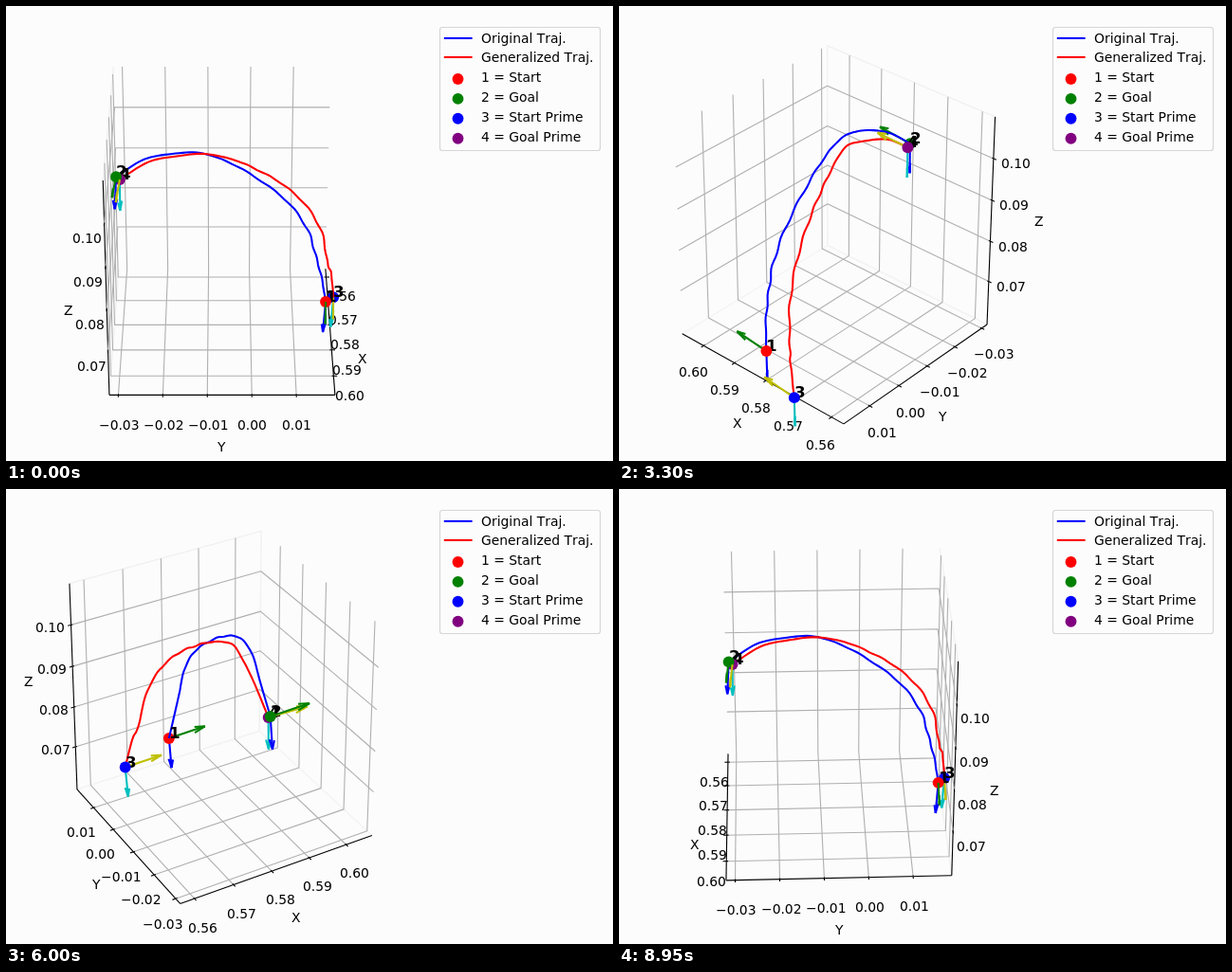
Write an HTML page with a canvas that moves like this. It is 640 px wide and 480 px high and loops after 9 s.

```html
<!DOCTYPE html>
<html lang="en">
<head>
<meta charset="utf-8">
<title>Rotating 3D trajectories</title>
<style>
  html, body { margin: 0; width: 100%; height: 100%; overflow: hidden; background: #fcfcfc; }
  canvas { display: block; }
</style>
</head>
<body>
<canvas id="stage" width="640" height="480"></canvas>
<script>
const ctx = document.getElementById('stage').getContext('2d');

// Plot area and camera
const AREA = { left: 15, bottom: 465, width: 414.6, height: 450 };
const ELEV = Math.PI / 6, DIST = 10;
const STEP_MS = 50, STEPS = 180;

// Data space is a unit cube centred on zero
const CENTER = [0.58173, -0.00667, 0.08442], RANGE = 0.0487;
const DELTA = 1 / 12, EDGE = 0.5 + DELTA / 4;
const PER_POINT = 48 / (0.72 * (AREA.width + AREA.height));
const TICK_PAD = 11.5 * PER_POINT * DELTA, NAME_PAD = 25 * PER_POINT * DELTA;
const THIN = 1.11, THICK = 2.08;

const BLUE = '#0000ff', RED = '#ff0000', GREEN = '#008000', PURPLE = '#800080';
const YELLOW = '#bfbf00', CYAN = '#00bfbf';
const FONT = '13.89px "DejaVu Sans", sans-serif';
const BOLD = 'bold 16.67px "DejaVu Sans", sans-serif';

const AXES = [
  { name: 'X', first: 0.56, count: 5, tickDir: 1, flip: 1 },
  { name: 'Y', first: -0.03, count: 5, tickDir: 0, flip: 0 },
  { name: 'Z', first: 0.07, count: 4, tickDir: 0, flip: 0 },
];

const ALONG = [0.2, -0.01, 0.01], DOWN = [0.007, -0.01, -0.155];
const START = { label: '1', name: 'Start', color: RED, at: [-0.018, 0.497, -0.389],
  arrows: [[GREEN, ALONG], [BLUE, DOWN]] };
const GOAL = { label: '2', name: 'Goal', color: GREEN, at: [-0.037, -0.495, 0.231],
  arrows: [[GREEN, ALONG], [BLUE, DOWN]] };
const START_PRIME = { label: '3', name: 'Start Prime', color: BLUE, at: [-0.24, 0.547, -0.503],
  arrows: [[YELLOW, ALONG], [CYAN, DOWN]] };
const GOAL_PRIME = { label: '4', name: 'Goal Prime', color: PURPLE, at: [-0.037, -0.478, 0.218],
  arrows: [[YELLOW, [0.2, -0.01, 0]], [CYAN, [0.002, -0.002, -0.153]]] };
const POINTS = [START, GOAL, START_PRIME, GOAL_PRIME];

const CURVES = [
  { name: 'Original Traj.', color: BLUE, path: smooth([
    GOAL.at, [-.014, -.364, .328], [.026, -.231, .377], [.042, -.1, .39], [.039, .031, .343],
    [.03, .163, .26], [.021, .306, .139], [.018, .401, .001], [.014, .442, -.13],
    [.003, .475, -.257], START.at]) },
  { name: 'Generalized Traj.', color: RED, path: smooth([
    GOAL_PRIME.at, [-.029, -.343, .308], [-.009, -.21, .347], [.004, -.078, .365],
    [-.029, .062, .316], [-.054, .164, .256], [-.084, .277, .174], [-.119, .396, .046],
    [-.153, .478, -.113], [-.18, .509, -.28], [-.206, .532, -.361], START_PRIME.at]) },
];

// Catmull-Rom curve through the key points, with a slight hand-moved ripple in the later part
function smooth(keys, perSpan = 8) {
  const path = [], last = keys.length - 1;
  for (let i = 0; i <= last * perSpan; i++) {
    const k = Math.min(Math.floor(i / perSpan), last - 1), t = i / perSpan - k;
    const [a, b, c, d] = [k - 1, k, k + 1, k + 2].map(n => keys[Math.max(0, Math.min(last, n))]);
    const ripple = 0.0025 * Math.sin(Math.PI * (i / (last * perSpan)) ** 2) * Math.sin(i * 0.9);
    path.push(b.map((v, j) => ripple + v + t / 2 * (c[j] - a[j]
      + t * (2 * a[j] - 5 * v + 4 * c[j] - d[j] + t * (3 * (v - c[j]) + d[j] - a[j])))));
  }
  return path;
}

const dot = (a, b) => a[0] * b[0] + a[1] * b[1] + a[2] * b[2];
const add = (a, b, k = 1) => a.map((v, i) => v + k * b[i]);
const replaced = (p, i, v) => p.map((old, k) => k === i ? v : old);
const flipped = (p, i) => replaced(p, i, -p[i]);
// Pushes a position outwards along every axis except the given one
const outward = (p, axis, d) => p.map((v, i) => i === axis ? v : v < 0 ? v - d : v + d);

function makeCamera(azim) {
  const c = Math.cos(azim), s = Math.sin(azim), ce = Math.cos(ELEV), se = Math.sin(ELEV);
  const right = [-s, c, 0], up = [-se * c, -se * s, ce], toward = [ce * c, ce * s, se];
  const project = p => {
    const w = DIST - dot(toward, p);
    return [
      AREA.left + (dot(right, p) / w + 0.095) / 0.185 * AREA.width,
      AREA.bottom - (dot(up, p) / w + 0.095) / 0.185 * AREA.height,
    ];
  };
  return { toward, project };
}

function stroke(points, color, width) {
  ctx.beginPath();
  points.forEach(p => ctx.lineTo(p[0], p[1]));
  ctx.strokeStyle = color;
  ctx.lineWidth = width;
  ctx.stroke();
}

function disc(x, y, color) {
  ctx.beginPath();
  ctx.arc(x, y, 5.95, 0, 2 * Math.PI);
  ctx.fillStyle = color;
  ctx.fill();
}

function text(str, x, y, font = FONT) {
  ctx.font = font;
  ctx.fillStyle = '#000';
  ctx.fillText(str, Math.round(x), Math.round(y));
}

function centered(str, [x, y], drop) {
  ctx.font = FONT;
  const ink = ctx.measureText(str);
  text(str, x - (ink.actualBoundingBoxRight + ink.actualBoundingBoxLeft) / 2, y + drop);
}

// Shaft plus two barbs turned 15 degrees up and down within the shaft's vertical plane
function arrowLines(from, dir) {
  const tip = add(from, dir), flat = Math.hypot(dir[0], dir[1]);
  const barb = angle => {
    const c = Math.cos(angle), s = Math.sin(angle), k = c - s * dir[2] / flat;
    const turned = [dir[0] * k, dir[1] * k, dir[2] * c + flat * s];
    return [tip, add(tip, turned, -0.3)];
  };
  return [[from, tip], barb(Math.PI / 12), barb(-Math.PI / 12)];
}

function drawPanes(project, back) {
  for (const [i, a, b, color] of [[1, 0, 2, '#f1f1f1'], [2, 0, 1, '#f4f4f4']]) {
    const corners = [[-1, -1], [1, -1], [1, 1], [-1, 1]].map(([p, q]) =>
      project(replaced(replaced(back, a, p * EDGE), b, q * EDGE)));
    stroke(corners, color, 1.39);
  }
}

function drawAxis(index, project, back) {
  const { name, first, count, tickDir, flip } = AXES[index];
  const start = flipped(back, flip), end = flipped(start, index);
  stroke([project(start), project(end)], '#000', THIN);
  centered(name, project(outward(replaced(start, index, 0), index, NAME_PAD)), 4);

  const values = Array.from({ length: count }, (_, i) => first + i * 0.01);
  const places = values.map(v => (v - CENTER[index]) / RANGE);
  for (const place of places) {
    const corner = replaced(back, index, place);
    const line = [flipped(corner, (index + 1) % 3), corner, flipped(corner, (index + 2) % 3)];
    stroke(line.map(project), '#b0b0b0', THIN);
  }

  const sign = Math.sign(back[tickDir]);
  places.forEach((place, i) => {
    const base = replaced(start, index, place);
    const tickEnd = k => project(replaced(base, tickDir, base[tickDir] + k * sign * DELTA));
    stroke([tickEnd(0.1), tickEnd(-0.2)], '#000', THIN);
    const minus = values[i] < -0.001 ? '\u2212' : '';
    centered(minus + Math.abs(values[i]).toFixed(2), project(outward(base, index, TICK_PAD)), 11);
  });
}

function drawLegend() {
  ctx.beginPath();
  ctx.roundRect(457.5, 22.5, 169, 130, 2.8);
  ctx.fillStyle = '#fcfcfc';
  ctx.fill();
  ctx.strokeStyle = '#d6d6d6';
  ctx.lineWidth = 1.2;
  ctx.stroke();
  const rowText = (str, row) => text(str, 501, 38.5 + 20.8 * row);
  CURVES.forEach(({ name, color }, row) => {
    const y = Math.round(33.5 + 20.8 * row);
    stroke([[461.8, y], [491.6, y]], color, THICK);
    rowText(name, row);
  });
  POINTS.forEach(({ label, name, color }, i) => {
    disc(476.5, 77 + 20.9 * i, color);
    rowText(`${label} = ${name}`, i + 2);
  });
}

// Arrows and markers, farthest first
function sortedItems(project, toward) {
  const items = [];
  for (const { at, arrows } of POINTS) {
    for (const [color, dir] of arrows) {
      const lines = arrowLines(at, dir);
      const near = Math.max(...lines.flat().map(p => dot(toward, p)));
      items.push({ near, draw: () => lines.forEach(l => stroke(l.map(project), color, THICK)) });
    }
  }
  for (const { at, color } of POINTS) {
    items.push({ near: dot(toward, at), draw: () => disc(...project(at), color) });
  }
  return items.sort((a, b) => a.near - b.near);
}

function draw(step) {
  const { toward, project } = makeCamera(step * 2 * Math.PI / STEPS);
  const back = toward.map(n => n < -1e-9 ? EDGE : -EDGE);
  ctx.fillStyle = '#fcfcfc';
  ctx.fillRect(0, 0, 640, 480);
  ctx.lineJoin = 'round';
  ctx.fontKerning = 'none';

  drawPanes(project, back);
  for (let i = 0; i < 3; i++) drawAxis(i, project, back);

  // Only the farthest items lie under the curves and the labels
  const items = sortedItems(project, toward);
  const drawItems = (from, to) => items.slice(from, to).forEach(item => item.draw());
  drawItems(0, 3);
  for (const { path, color } of CURVES) stroke(path.map(project), color, THICK);
  drawItems(3, 4);
  for (const { label, at } of POINTS) text(label, ...project(at), BOLD);
  drawItems(4);
  drawLegend();
}

const began = performance.now();
function tick() {
  draw(Math.floor((performance.now() - began) / STEP_MS) % STEPS);
  requestAnimationFrame(tick);
}
tick();
</script>
</body>
</html>
```
